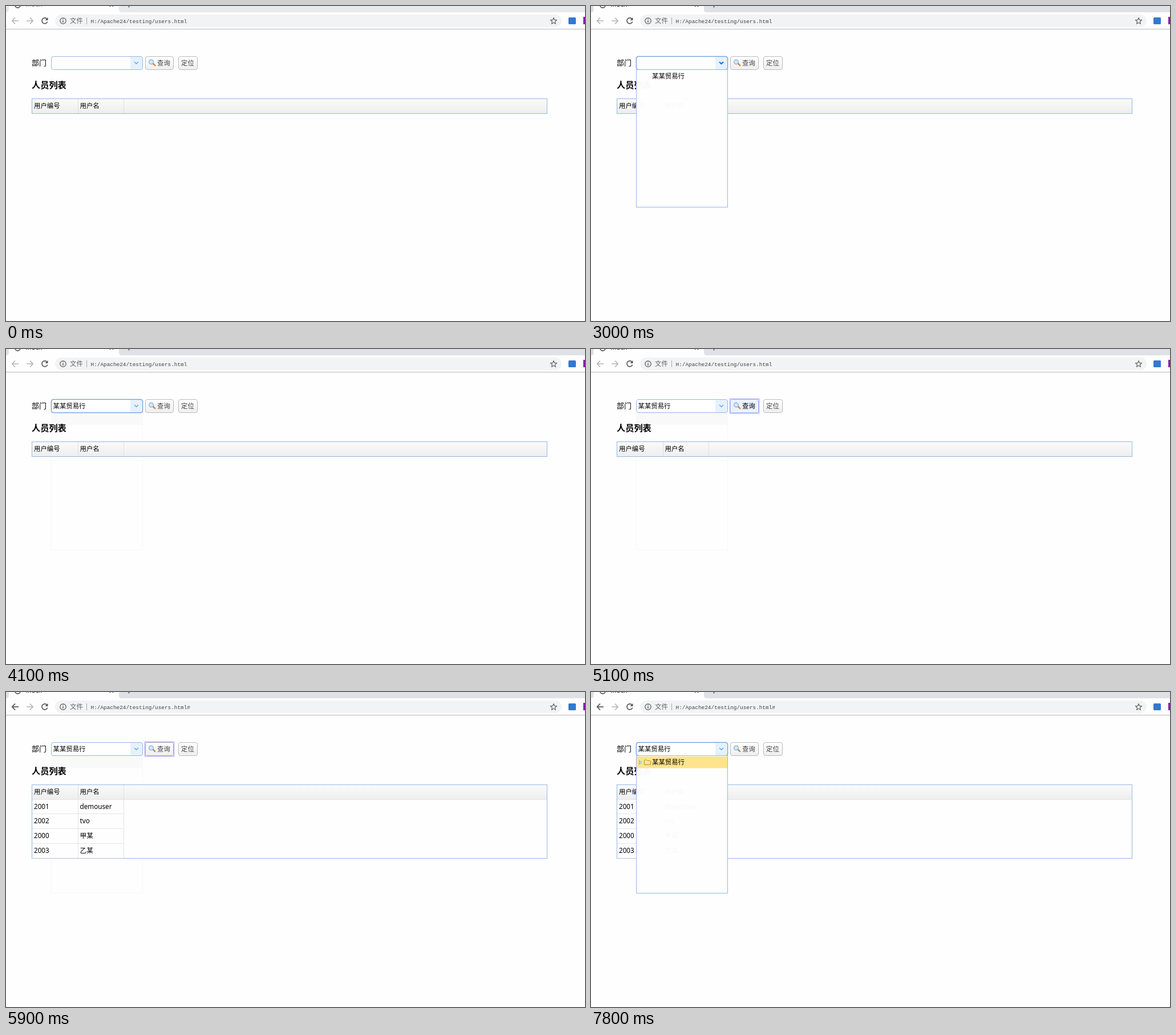
An HTML page for the animation above (8000 ms loop, 1015x552 px).

```html
<!DOCTYPE html>
<html lang="zh-CN">
<head>
<meta charset="utf-8">
<title>人员列表</title>
<style>
html, body { margin: 0; width: 100%; height: 100%; overflow: hidden; background: #fefefe; }
svg { display: block; font: 11.4px "Noto Sans CJK SC", "Noto Sans CJK", sans-serif; }
.mono { font: 9.4px "Liberation Mono", monospace; fill: #444; }
.cell { font: 11.7px "Noto Sans", "Noto Sans CJK SC", "Noto Sans CJK", sans-serif; }
.line { fill: none; stroke: #555; stroke-width: 1.6; }
.off { stroke: #b4b4b4; }
.frame { fill: none; stroke: #95b8e7; }
.rule { fill: none; stroke: #ccc; stroke-dasharray: 1 1; }
</style>
</head>
<body>
<svg width="1015" height="552" viewBox="0 0 1015 552">
  <defs>
    <linearGradient id="head" x2="0" y2="1"><stop stop-color="#fafafa"/><stop offset="1" stop-color="#eee"/></linearGradient>
    <linearGradient id="button" x2="0" y2="1"><stop stop-color="#fff"/><stop offset="1" stop-color="#eee"/></linearGradient>
    <path id="chevron" d="M225 98l3.5 3.3 3.5-3.3" fill="none"/>
    <g id="lens">
      <path d="M258 101l3.2 3.2" stroke="#d58a3c" stroke-width="2.6" stroke-linecap="round"/>
      <circle cx="254.5" cy="98" r="3.9" fill="#cfe8fb" stroke="#86add0" stroke-width="1.2"/>
    </g>
  </defs>

  <!-- browser bar -->
  <path d="M0 0H5V6Q5 11 0 11ZM198 0H1015V11H203Q198 11 198 6Z" fill="#e7eaed"/>
  <path d="M0 0H5V6Q5 11 0 11ZM198 0H1015V11H203Q198 11 198 6Z" fill="#dee1e6" data-on="2900-8000"/>
  <circle cx="20.5" cy="-1.5" r="4.6" class="line"/>
  <text x="34" y="1" fill="#777">Index</text>
  <text x="34" y="1" fill="#222" data-on="2900-8000">Index</text>
  <path d="M182 1l6-6M188 1l-6-6M215.5 0v2.5" class="line" stroke-width="1"/>
  <path d="M0 40.5H1015" stroke="#b8b8b8"/>
  <rect x="86" y="15" width="888" height="22" rx="11" fill="#f1f3f4"/>
  <path d="M22 26H11M16 20.5L10.8 26L16 31.5" class="line off"/>
  <path d="M22 26H11M16 20.5L10.8 26L16 31.5" class="line" data-on="5300-8000"/>
  <path d="M36 26H47M42 20.5L47.2 26L42 31.5" class="line off"/>
  <path d="M72.2 23.2A5 5 0 1 0 72.7 27.5" class="line"/>
  <path d="M73.5 20v5h-5z" fill="#555"/>
  <circle cx="100" cy="26" r="5.2" class="line" style="stroke-width:1.2"/>
  <path d="M100 25v4M100 22.6v1.4" class="line" style="stroke-width:1.3"/>
  <text x="112" y="30.3" fill="#5f6368">文件</text>
  <path d="M141.5 20v12" stroke="#a5a8ac"/>
  <text x="148.5" y="29.5" class="mono">H:/Apache24/testing/users.html<tspan data-on="5300-8000">#</tspan></text>
  <path d="M960 20.8l1.5 3.5 3.9.4-2.9 2.6.8 3.8-3.3-2-3.3 2 .8-3.8-2.9-2.6 3.9-.4z" class="line" style="stroke-width:1.1"/>
  <rect x="986" y="20" width="13" height="12" rx="1.5" fill="#3478d0"/>
  <rect x="1012" y="19" width="3" height="13" fill="#9019b0"/>

  <!-- trace left by the closed list -->
  <g data-on="4100-8000">
    <rect x="79" y="112" width="161" height="21" fill="#f9f9f9"/>
    <path d="M79.5 133V352.5H239.5V133" fill="none" stroke="#f7f7f7"/>
  </g>

  <!-- query form -->
  <text x="45" y="104" style="font-size:13px">部门</text>
  <rect x="79.5" y="88.5" width="160" height="23" rx="3.5" fill="#fff"/>
  <path d="M218 89h18q3 0 3 3v16q0 3-3 3h-18z" fill="#e6f1fd"/>
  <rect x="79.5" y="88.5" width="160" height="23" rx="3.5" class="frame"/>
  <g fill="none" data-on="2900-5100 7200-8000">
    <rect x="78.5" y="87.5" width="162" height="25" rx="4.5" stroke="#dfe5ee"/>
    <rect x="79.5" y="88.5" width="160" height="23" rx="3.5" stroke="#6b9cde"/>
  </g>
  <use href="#chevron" stroke="#58aade" stroke-width="1.4"/>
  <use href="#chevron" stroke="#0b7bd0" stroke-width="2" data-on="800-1300 2300-3300 6800-7300"/>
  <text x="82.5" y="104" data-on="4100-8000">某某贸易行</text>
  <g id="buttons"></g>
  <rect x="243.5" y="87.5" width="51" height="25" fill="none" stroke="#2a2ae0" stroke-dasharray="1 1" data-on="5100-7100"/>

  <!-- table -->
  <text x="45" y="143.8" style="font-size:15.2px;font-weight:bold">人员列表</text>
  <g data-on="5400-8000">
    <rect x="45.5" y="162.5" width="903" height="129" fill="#fefefe" stroke="#95b8e7"/>
    <g id="rows"></g>
    <path d="M126.5 188V291M206.5 188V291" class="rule"/>
  </g>
  <rect x="46" y="163" width="902" height="25" fill="url(#head)"/>
  <path d="M126.5 163V188M206.5 163V188" class="rule"/>
  <path d="M46 188.5H948" class="rule" data-on="5400-8000"/>
  <text x="49" y="178.8">用户编号</text>
  <text x="129.5" y="178.8">用户名</text>
  <rect x="45.5" y="162.5" width="903" height="26" class="frame" data-on="0-5400"/>
  <g data-on="5300-5400">
    <rect x="46" y="163" width="902" height="25" fill="#ccc" opacity=".35"/>
    <rect x="420.5" y="162.5" width="153" height="26" fill="#fff" stroke="#95b8e7" stroke-width="1.5"/>
    <circle cx="431.3" cy="175.3" r="4.7" fill="none" stroke="#c9d3e6" stroke-width="1.8"/>
    <path d="M429 171.2A4.7 4.7 0 0 0 434.5 178.7" fill="none" stroke="#3d5a96" stroke-width="1.8"/>
    <text x="445" y="179.8">正在处理，请稍待。。。</text>
  </g>

  <!-- drop-down list -->
  <g data-on="3000-4100 7200-8000">
    <rect x="80" y="112" width="159" height="240" fill="#fefefe" opacity=".975"/>
    <rect x="80" y="112" width="159" height="21" fill="#eaf2ff" data-on="3300-4100"/>
    <rect x="80" y="113" width="159" height="20.5" fill="#ffe48d" data-on="7200-8000"/>
    <rect x="79.5" y="111.5" width="160" height="241" class="frame"/>
    <g data-on="3100-4100 7300-8000">
      <path d="M85 120v7l3.5-3.5z" fill="#fff" stroke="#aaa"/>
      <path d="M85 120v7l3.5-3.5z" fill="#c8f0ff" stroke="#3fc0ee" data-on="7800-8000"/>
      <path d="M93.5 127.5v-7.500q0-1 1-1h3l1.500 1.500h4.500q1 0 1 1v6z" fill="#fbe28c" stroke="#bd9127"/>
      <path d="M95 122.500h8" stroke="#fff5c8"/>
    </g>
    <text x="107" y="127.3">某某贸易行</text>
  </g>
</svg>
<script>
const DURATION = 8000;

const button = (x, width, label, labelX, icon, hover) => {
  const face = (fill, stroke, ink) =>
    `<rect x="${x + .5}" y="88.5" width="${width - 1}" height="23" rx="3.5" fill="${fill}" stroke="${stroke}"/>
     <text x="${labelX}" y="104.300" fill="${ink}">${label}</text>${icon}`;
  return face('url(#button)', '#bbb', '#444') +
    `<g data-on="${hover}">${face('#eaf2ff', '#b7d2ff', '#000')}</g>`;
};

document.getElementById('buttons').innerHTML =
  button(244, 50, '查询', 265, '<use href="#lens"/>', '4600-5900') +
  button(302, 34, '定位', 307, '', '700-800');

const people = [[2001, 'demouser'], [2002, 'tvo'], [2000, '甲某'], [2003, '乙某']];
document.getElementById('rows').innerHTML = people.map(([id, name], i) => {
  const y = 204.5 + i * 25.8;
  return `<text class="cell" x="49" y="${y}">${id}</text>
    <text class="cell" x="129.5" y="${y}">${name}</text>
    <path class="rule" d="M46 ${213.5 + i * 26}H206"/>`;
}).join('');

const parts = [...document.querySelectorAll('[data-on]')].map(node => ({
  node,
  spans: node.dataset.on.split(' ').map(span => span.split('-').map(Number)),
}));

function render(now) {
  const t = now % DURATION;
  for (const { node, spans } of parts) {
    node.style.display = spans.some(([from, to]) => t >= from && t < to) ? '' : 'none';
  }
}

const start = performance.now();
function tick() {
  render(performance.now() - start);
  requestAnimationFrame(tick);
}
tick();
</script>
</body>
</html>
```
